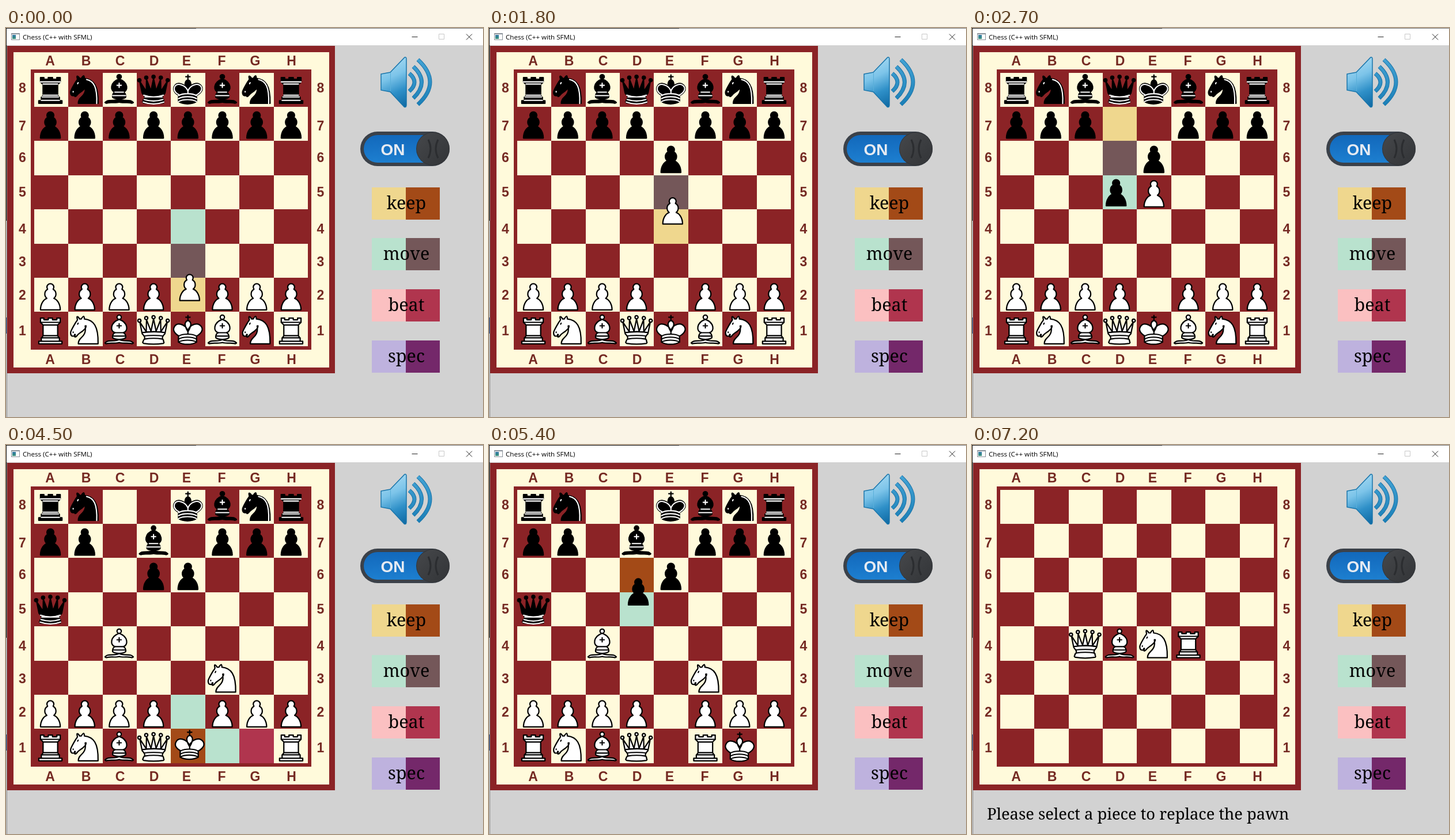
Recreate the animation shown at these times as an HTML page with a canvas. Size 828x676 px, loop 8000 ms.

```html
<!DOCTYPE html>
<html lang="en">
<head>
<meta charset="utf-8">
<title>Chess</title>
<style>
html, body { margin: 0; width: 100%; height: 100%; overflow: hidden; background: #d2d2d2; }
canvas { display: block; }
</style>
</head>
<body>
<canvas id="stage" width="828" height="676"></canvas>
<script>
const ctx = document.getElementById('stage').getContext('2d');
const STEP = 900, LOOP = 8000;
const CELL = 59.36, BOARD_X = 49, BOARD_Y = 77.7;
const PITCH = 59.7, PIECE_X = 43.5, PIECE_Y = 72.8, PIECE_SCALE = 1.49;
const RED = '#8b2326', CREAM = '#fffadb', SERIF = '"Noto Serif", serif';

// Mark colours on light and dark squares
const MARKS = {
  keep: ['#efd78e', '#a34a17'],
  move: ['#b9e2ce', '#745759'],
  beat: ['#fbc0c1', '#b0354e'],
  spec: ['#beb2de', '#74286a']
};

// Outlines and inner lines in a 45-unit box; dark pieces may use other lines
const PIECES = {
  p: { body: 'M22.5 9c-2.21 0-4 1.79-4 4 0 .89.29 1.71.78 2.38C17.33 16.5 16 18.59 16 21c0 2.03.94 3.84 2.41 5.03C15.41 27.09 11 31.58 11 39.5H34C34 31.58 29.59 27.09 26.59 26.03 28.06 24.84 29 23.03 29 21c0-2.41-1.33-4.5-3.28-5.62.49-.67.78-1.49.78-2.38 0-2.21-1.79-4-4-4z' },
  r: {
    body: 'M9 39h27v-3H9zM12 36v-4h21v4zM12.5 32l1.5-2.5h17l1.5 2.5zM14 29.5V17h17v12.5zM14 17l-3-3V9h4v2h5V9h5v2h5V9h4v5l-3 3z',
    lines: 'M11 14h23',
    dark: 'M12 35.5h21M13 31.5h19M14 29.5h17M14 16.5h17M11 14h23'
  },
  n: {
    body: 'M22 10C32.5 11 38.5 18 38 39H15C15 30 25 32.5 23 18L24 18C24.38 20.91 18.45 25.37 16 27 13 29 13.18 31.34 11 31 9.96 30.06 12.41 27.96 11 28 10 28 11.19 29.23 10 30 9 30 6 31 6 26 6 24 12 14 12 14S13.89 12.1 14 10.5C13.27 9.5 13.5 8.5 13.5 7.5 14.5 6.5 16.5 10 16.5 10H18.5S19.28 8 21 7C22 7 22 10 22 10z',
    lines: 'M9 25.2v.6M14.2 16.1l.6-1.2',
    dark: 'M9 25.2v.6M14.2 16.1l.6-1.2M24.6 11.2C33 13 37.2 20 36.4 39.2'
  },
  b: {
    body: 'M9 36c3.39-.97 10.11.43 13.5-2 3.39 2.43 10.11 1.03 13.5 2 0 0 1.65.54 3 2-.68.97-1.65.99-3 .5-3.39-.97-10.11.46-13.5-1-3.39 1.46-10.11.03-13.5 1-1.35.49-2.32.47-3-.5 1.35-1.46 3-2 3-2zM15 32c2.5 2.5 12.5 2.5 15 0 .5-1.5 0-2 0-2 0-2.5-2.5-4-2.5-4 5.5-1.5 6-11.5-5-15.5-11 4-10.5 14-5 15.5 0 0-2.5 1.5-2.5 4 0 0-.5.5 0 2zM25 8a2.5 2.5 0 1 1-5 0 2.5 2.5 0 1 1 5 0z',
    lines: 'M17.5 26h10M15 30h15M22.5 15.5v5M20 18h5'
  },
  q: {
    body: 'M9 26c8.5-1.5 21-1.5 27 0l2.5-12.5L31 25l-.3-14.1-5.2 13.6-3-14.5-3 14.5-5.2-13.6L14 25 6.5 13.5zM9 26c0 2 1.5 2 2.5 4 1 1.5 1 1 .5 3.5-1.5 1-1.5 2.5-1.5 2.5-1.5 1.5.5 2.5.5 2.5 6.5 1 16.5 1 23 0 0 0 1.5-1 0-2.5 0 0 .5-1.5-1-2.5-.5-2.5-.5-2 .5-3.5 1-2 2.5-2 2.5-4-8.5-1.5-18.5-1.5-27 0z'
      + [[6, 12], [14, 9], [22.5, 8], [31, 9], [39, 12]].map(([x, y]) => `M${x + 1.8} ${y}a1.8 1.8 0 1 1-3.6 0 1.8 1.8 0 1 1 3.6 0z`).join(''),
    lines: 'M11.5 30c3.5-1 18.5-1 22 0M12 33.5c6-1 15-1 21 0',
    dark: 'M11 29.5a35 35 0 0 0 23 0M12.5 31.5h20M11.5 34.5a35 35 0 0 0 22 0M10.5 37.5a35 35 0 0 0 24 0'
  },
  k: {
    cross: 'M22.5 11.6V6M20 8h5',
    body: 'M22.5 25s4.5-7.5 3-10.5c0 0-1-2.5-3-2.5s-3 2.5-3 2.5c-1.5 3 3 10.5 3 10.5zM11.5 37c5.5 3.5 15.5 3.5 21 0v-7s9-4.5 6-10.5c-4-6.5-13.5-3.5-16 4V27v-3.5c-3.5-7.5-13-10.5-16-4-3 6 5 10 5 10z',
    lines: 'M11.5 30c5.5-3 15.5-3 21 0m-21 3.5c5.5-3 15.5-3 21 0m-21 3.5c5.5-3 15.5-3 21 0',
    dark: 'M32 29.5s8.5-4 6-9.65C34.15 14 25 18 22.5 24.5v2.1-2.1C20 18 9.9 14 7 19.85c-2.5 5.65 4.85 9 4.85 9M11.5 30c5.5-3 15.5-3 21 0m-21 3.5c5.5-3 15.5-3 21 0m-21 3.5c5.5-3 15.5-3 21 0'
  }
};
for (const piece of Object.values(PIECES))
  for (const part in piece) piece[part] = new Path2D(piece[part]);

// held: piece, column and row of the piece being dragged
const HOME = 'PPPP1PPP/RNBQKBNR';
const SCENES = [
  { board: 'rnbqkbnr/pppppppp/8/8/8/8/' + HOME, held: ['P', 4.05, 5.73], marks: { e2: 'keep', e3: 'move', e4: 'move' } },
  { board: 'rnbqkbnr/pppp1ppp/8/8/4P3/8/' + HOME, held: ['p', 4.05, 1.46], marks: { e7: 'keep', e6: 'move', e5: 'move' } },
  { board: 'rnbqkbnr/pppp1ppp/4p3/8/8/8/' + HOME, held: ['P', 4.05, 3.5], marks: { e4: 'keep', e5: 'move' } },
  { board: 'rnbqkbnr/ppp2ppp/4p3/4P3/8/8/' + HOME, held: ['p', 2.9, 2.97], marks: { d7: 'keep', d6: 'move', d5: 'move' } },
  { board: 'rnbqkbnr/ppp2ppp/4p3/3p4/8/8/' + HOME, held: ['P', 3.5, 2.5], marks: { e5: 'keep', d6: 'beat' } },
  { board: 'rn2kbnr/pp1b1ppp/3pp3/q7/2B5/5N2/PPPP1PPP/RNBQ3R', held: ['K', 4.05, 6.94], marks: { e1: 'keep', e2: 'move', f1: 'move', g1: 'beat' } },
  { board: 'rn2kbnr/pp1b1ppp/4p3/q7/2B5/5N2/PPPP1PPP/RNBQ1RK1', held: ['p', 3.05, 2.45], marks: { d6: 'keep', d5: 'move' } },
  { board: '5knr/7p/8/2n5/8/4B3/5PPP/R5K1', held: ['P', 1, 0.54], marks: { b7: 'keep', b8: 'spec' } },
  { board: '8/8/8/8/2QBNR2/8/8/8', marks: {}, note: 'Please select a piece to replace the pawn' }
];

function rect(color, x, y, w, h) {
  ctx.fillStyle = color;
  ctx.fillRect(x, y, w, h);
}

function pill(color, x, y, w, h) {
  ctx.fillStyle = color;
  ctx.beginPath();
  ctx.roundRect(x, y, w, h, h / 2);
  ctx.fill();
}

function line(color, width, path) {
  ctx.strokeStyle = color;
  ctx.lineWidth = width;
  ctx.stroke(path instanceof Path2D ? path : new Path2D(path));
}

function text(str, x, y, font, color = '#000', align = 'center') {
  ctx.font = font;
  ctx.fillStyle = color;
  ctx.textAlign = align;
  ctx.fillText(str, x, y);
}

function gradient(x0, y0, x1, y1, ...colors) {
  const g = ctx.createLinearGradient(x0, y0, x1, y1);
  colors.forEach((c, i) => g.addColorStop(i / (colors.length - 1), c));
  return g;
}

function drawWindow() {
  rect('#d2d2d2', 0, 0, 828, 676);
  rect('#fff', 1, 1, 827, 29);
  rect('#777', 330, 0, 498, 1);
  rect('#111', 0, 0, 330, 1);
  rect('#111', 0, 0, 1, 335);
  rect('#1d3a78', 0, 503, 1, 28);
  rect('#8a8a8a', 1, 30, 1, 646);
  rect('#8a9199', 9, 9, 15, 12);
  rect('#fff', 10, 11, 13, 9);
  rect(gradient(0, 11, 0, 20, '#2d6fae', '#3f9a72'), 11, 12, 6, 7);
  text('Chess (C++ with SFML)', 29, 20, '11.6px "Open Sans", sans-serif', '#000', 'left');
  line('#222', 1, 'M704.5 15.5h10M799 10.5l10 10M809 10.5l-10 10');
  line('#c8c8c8', 1, 'M751.5 10.5h9v9h-9z');
}

function drawSpeaker() {
  ctx.fillStyle = gradient(655, 62, 690, 136, '#a5d9f2', '#7cc4e9', '#2f90c8', '#116ca6');
  const cone = new Path2D('M651 80L667 77 692 51Q695 50 695 54V134Q695 139 691 137L667 111 651 108z');
  ctx.fill(cone);
  line('#1b76ab', 1.5, cone);
  line('#5aafd9', 1, 'M667.5 78v32');
  const waves = 'M700 79Q718 94 700 110M707 67Q736 94 707 122M715 55Q757 94 715 133';
  line('#1a73a8', 7, waves);
  line(gradient(0, 55, 0, 133, '#42a3d5', '#1b80b8'), 5, waves);
}

function drawSwitch() {
  pill('#3b4149', 615, 180, 155, 60);
  pill(gradient(0, 186, 0, 234, '#1268bb', '#1d7fd0'), 621, 186, 143, 48);
  pill('#323437', 712, 181, 58, 58);
  pill(gradient(715, 185, 767, 235, '#45474a', '#333538'), 713, 182, 56, 56);
  line('#2b2d30', 3, 'M733 194Q741 210 733 226M750 194Q742 210 750 226');
  text('ON', 671.5, 221, 'bold 28px "Liberation Sans", Arial, sans-serif', '#e6ebf2');
}

function drawLegend() {
  Object.entries(MARKS).forEach(([name, [light, dark]], i) => {
    const y = Math.round(276.6 + i * 88.7);
    rect(light, 635, y, 59, 56);
    rect(dark, 694, y, 59, 56);
    text(name, 695, y + 38, '30.5px ' + SERIF);
  });
}

function drawBoard(marks) {
  rect(RED, 2, 31, 569, 569);
  rect(CREAM, 13, 42, 548, 548);
  rect(RED, 43, 72, 487, 487);
  for (let row = 0; row < 8; row++)
    for (let col = 0; col < 8; col++) {
      const dark = (row + col) % 2;
      const mark = marks['abcdefgh'[col] + (8 - row)];
      const x = Math.round(BOARD_X + col * CELL), y = Math.round(BOARD_Y + row * CELL);
      const w = Math.round(BOARD_X + (col + 1) * CELL) - x;
      const h = Math.round(BOARD_Y + (row + 1) * CELL) - y;
      rect(mark ? MARKS[mark][dark] : dark ? RED : CREAM, x, y, w, h);
    }
  const font = 'bold 23px "Liberation Sans", Arial, sans-serif', brown = '#752a23';
  [76.5, 139, 198, 257, 313.5, 374.5, 432.5, 495.5].forEach((x, i) => {
    text('ABCDEFGH'[i], x, 64.5, font, brown);
    text('ABCDEFGH'[i], x, 583.5, font, brown);
  });
  [104, 170, 225, 285, 348.5, 406, 464, 526].forEach((y, i) => {
    text(8 - i, 28.5, y + 8, font, brown);
    text(8 - i, 546, y + 8, font, brown);
  });
}

function drawPiece(code, col, row) {
  const shape = PIECES[code.toLowerCase()], white = code < 'a';
  ctx.save();
  ctx.translate(PIECE_X + col * PITCH, PIECE_Y + row * PITCH);
  ctx.scale(PIECE_SCALE, PIECE_SCALE);
  ctx.lineCap = ctx.lineJoin = 'round';
  if (shape.cross) line('#000', 1.5, shape.cross);
  ctx.fillStyle = white ? '#fff' : '#000';
  ctx.fill(shape.body);
  line('#000', 1.5, shape.body);
  if (shape.lines) line(white ? '#000' : '#fff', 1.4, !white && shape.dark || shape.lines);
  ctx.restore();
}

function drawScene({ board, marks, held, note }) {
  drawWindow();
  drawSpeaker();
  drawSwitch();
  drawLegend();
  drawBoard(marks);
  board.split('/').forEach((rank, row) => {
    let col = 0;
    for (const c of rank) {
      if (c > '0' && c < '9') col += +c;
      else drawPiece(c, col++, row);
    }
  });
  if (held) drawPiece(...held);
  if (note) text(note, 26, 650.5, '27.3px ' + SERIF, '#000', 'left');
}

let shown = -1;
function tick() {
  const index = Math.floor(performance.now() % LOOP / STEP);
  if (index !== shown) drawScene(SCENES[shown = index]);
  requestAnimationFrame(tick);
}
tick();
</script>
</body>
</html>
```
